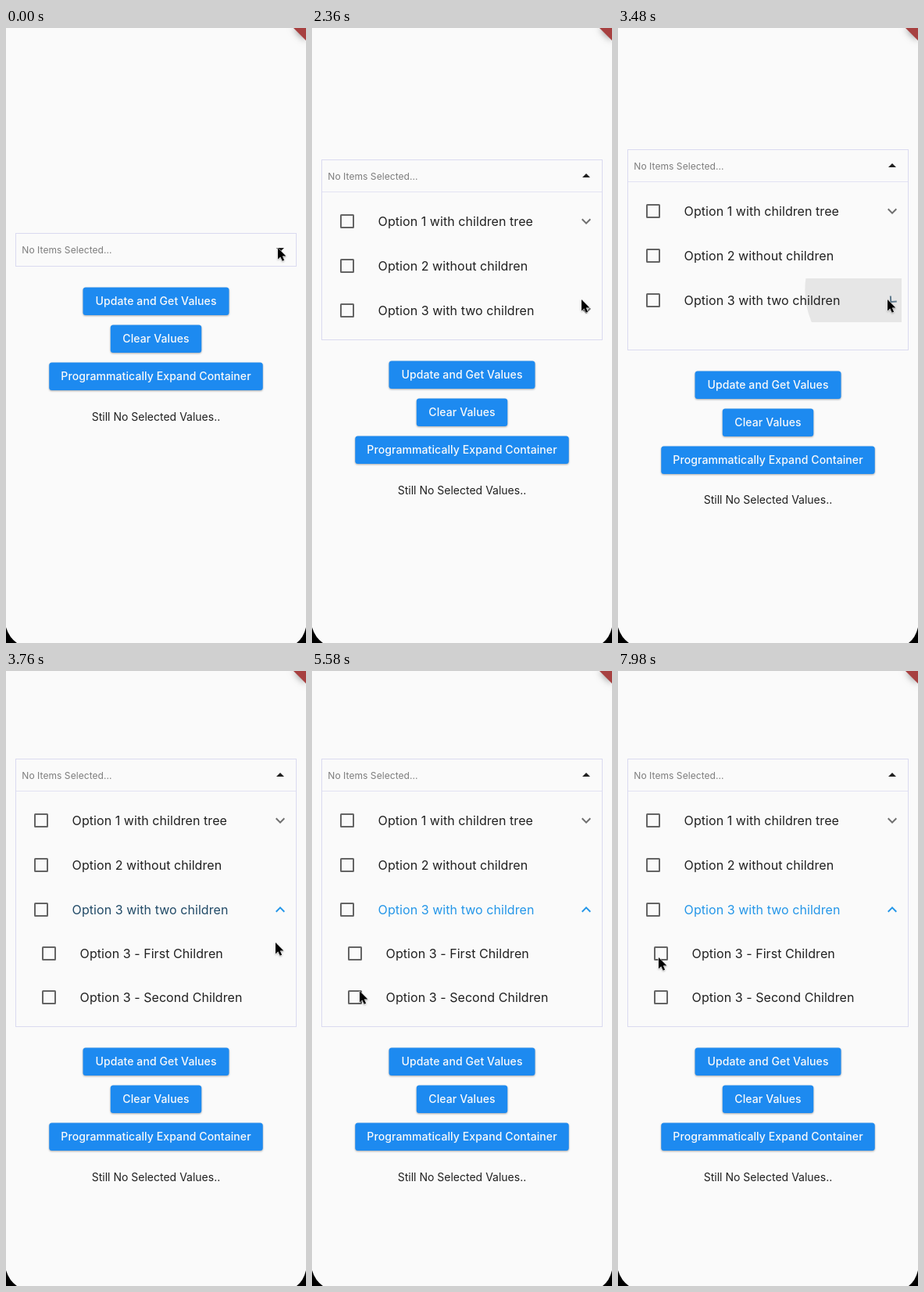
Recreate the animation shown at these times as an HTML page. Size 384 by 786 pixels, loop 8 s.

```html
<!DOCTYPE html>
<html lang="en">
<head>
<meta charset="utf-8">
<title>Tree dropdown</title>
<style>
  html, body { margin: 0; width: 100%; height: 100%; overflow: hidden; background: #fafafa; }
  svg { display: block; width: 384px; height: 786px; font-family: Inter, Roboto, sans-serif; }
  text { fill: #202020; font-size: 16px; letter-spacing: .06px; }
  .hint { fill: #7c7c7c; font-size: 12px; }
  .status { font-size: 14px; letter-spacing: 0; text-anchor: middle; }
  .button rect { fill: #1d8af0; filter: drop-shadow(0 1.5px 1px rgba(0, 0, 0, .32)); }
  .button text { fill: #fafafa; font-size: 14px; font-weight: 500; letter-spacing: .1px; text-anchor: middle; }
  .box { fill: none; stroke: #646464; stroke-width: 2; }
  .line { fill: none; stroke: #dadaf0; }
  .ribbon { fill: #a74040; filter: drop-shadow(0 0 5px rgba(0, 0, 0, .5)); }
  .cursor { fill: #000; stroke: #fff; stroke-width: 1; paint-order: stroke; filter: drop-shadow(0 1px 1px rgba(0, 0, 0, .3)); }
</style>
</head>
<body>
<svg viewBox="0 0 384 786">
  <defs>
    <clipPath id="bodyClip"><rect id="bodyRect" x="12" y="0" width="360" height="42"/></clipPath>
    <clipPath id="tileClip"><rect x="21" y="164.5" width="342" height="56"/></clipPath>
    <clipPath id="childClip"><rect id="childRect" x="21" y="220.5" width="342" height="0"/></clipPath>
  </defs>
  <rect width="384" height="786" fill="#fafafa"/>
  <g id="panel">
    <g clip-path="url(#bodyClip)">
      <g clip-path="url(#tileClip)"><circle id="ripple" cx="345" cy="179" fill="#e6e6e6"/></g>
      <g id="rows"></g>
      <g clip-path="url(#childClip)"><g id="children"></g></g>
    </g>
    <path id="divider" class="line" d="M12.5 41H371.5"/>
    <rect id="frame" class="line" x="12.5" width="359"/>
    <text class="hint" x="20.3" y="25">No Items Selected...</text>
    <path id="caret" fill="#202020"/>
  </g>
  <g id="footer"></g>
  <path class="ribbon" d="M368 0H384V16Z"/>
  <path d="M0 766Q4 779 14 786H0ZM384 766Q381 779 372 786H384Z"/>
  <path id="cursor" class="cursor" d="M0 0V14.5L3.3 11.4L5.7 16.8L8.1 15.7L5.8 10.4H10.4Z"/>
</svg>
<script>
const LOOP = 8000;
const CENTER = 283.5;
const CLOSED = 42, LIST = 188, CHILDREN = 112;
const $ = id => document.getElementById(id);
const set = (el, attrs) => { for (const k in attrs) el.setAttribute(k, attrs[k]); };

const clamp = v => Math.min(1, Math.max(0, v));
const phase = (t, from, to) => clamp((t - from) / (to - from));
const smooth = p => p * p * (3 - 2 * p);
const easeIn = p => p ** 1.7;
const mix = (a, b, p) => a + (b - a) * p;
const mixColor = (a, b, p) => `rgb(${a.map((v, i) => Math.round(mix(v, b[i], p)))})`;

const INK = [32, 32, 32], GREY = [112, 112, 112], BLUE = [36, 150, 232];

const chevron = y => `<g transform="translate(351 ${y})"><path d="M4.59-3.41L0 1.17L-4.59-3.41L-6-2L0 4L6-2Z" fill="rgb(${GREY})"/></g>`;
const row = (y, x, label, open) => `<g><rect class="box" x="${x + 1}" y="${y - 8}" width="16" height="16" rx=".5"/>
  <text x="${x + 48.6}" y="${y + 6}">${label}</text>${open ? chevron(y) : ''}</g>`;
const button = (y, w, label) => `<g class="button"><rect x="${192 - w / 2}" y="${y + .4}" width="${w}" height="35.6" rx="3.5"/>
  <text x="192" y="${y + 23}">${label}</text></g>`;

$('rows').innerHTML =
  row(78.5, 36, 'Option 1 with children tree', true) +
  row(135.5, 36, 'Option 2 without children', false) +
  row(192.5, 36, 'Option 3 with two children', true);
$('children').innerHTML =
  row(248.5, 46, 'Option 3 - First Children', false) +
  row(304.5, 46, 'Option 3 - Second Children', false);
$('footer').innerHTML =
  button(26.5, 187, 'Update and Get Values') +
  button(74.5, 116.5, 'Clear Values') +
  button(122.5, 273.5, 'Programmatically Expand Container') +
  '<text class="status" x="192" y="197">Still No Selected Values..</text>';

const third = $('rows').lastElementChild;
const thirdText = third.querySelector('text');
const thirdIcon = third.querySelector('path');

// Pointer stops: time, x, y
const stops = [
  [0, 348, 281], [1750, 348, 281], [2300, 345, 347], [4700, 345, 347],
  [5500, 61, 409], [6600, 61, 409], [7300, 52, 366], [LOOP, 52, 366]
];

function pointer(t) {
  const i = stops.findIndex((s, n) => n && t <= s[0]);
  const a = stops[i - 1], b = stops[i];
  const p = smooth(phase(t, a[0], b[0]));
  return [mix(a[1], b[1], p), mix(a[2], b[2], p)];
}

function draw(t) {
  const open = easeIn(phase(t, 250, 550));
  const unfold = easeIn(phase(t, 3354, 3654));
  const height = CLOSED + LIST * open + CHILDREN * unfold;
  const top = CENTER - height / 2;

  set($('panel'), { transform: `translate(0 ${top})` });
  set($('footer'), { transform: `translate(0 ${top + height})` });
  set($('frame'), { height });
  set($('bodyRect'), { y: 41, height: height - 41 });
  set($('divider'), { opacity: open > 0 ? .75 : 0 });
  set($('caret'), {
    d: open > 0 ? 'M346 22.5L351 17.5L356 22.5Z' : 'M346 18.5L351 23.5L356 18.5Z'
  });

  // Children are revealed from their middle outwards
  set($('childRect'), { height: CHILDREN * unfold });
  set($('children'), { transform: `translate(0 ${-CHILDREN / 2 * (1 - unfold)})` });

  set(thirdIcon, {
    transform: `rotate(${180 * unfold})`,
    fill: mixColor(GREY, BLUE, unfold)
  });
  // The label recolours once the tile has unfolded
  thirdText.style.fill = mixColor(INK, BLUE, phase(t, 3654, 3954));

  const grow = phase(t, 3320, 3640);
  set($('ripple'), {
    r: 210 * grow,
    opacity: grow > 0 ? 1 - phase(t, 3480, 3700) : 0
  });

  set($('cursor'), { transform: `translate(${pointer(t).join(' ')})` });
}

const start = performance.now();
function tick() {
  draw((performance.now() - start) % LOOP);
  requestAnimationFrame(tick);
}
draw(0);
requestAnimationFrame(tick);
</script>
</body>
</html>
```
